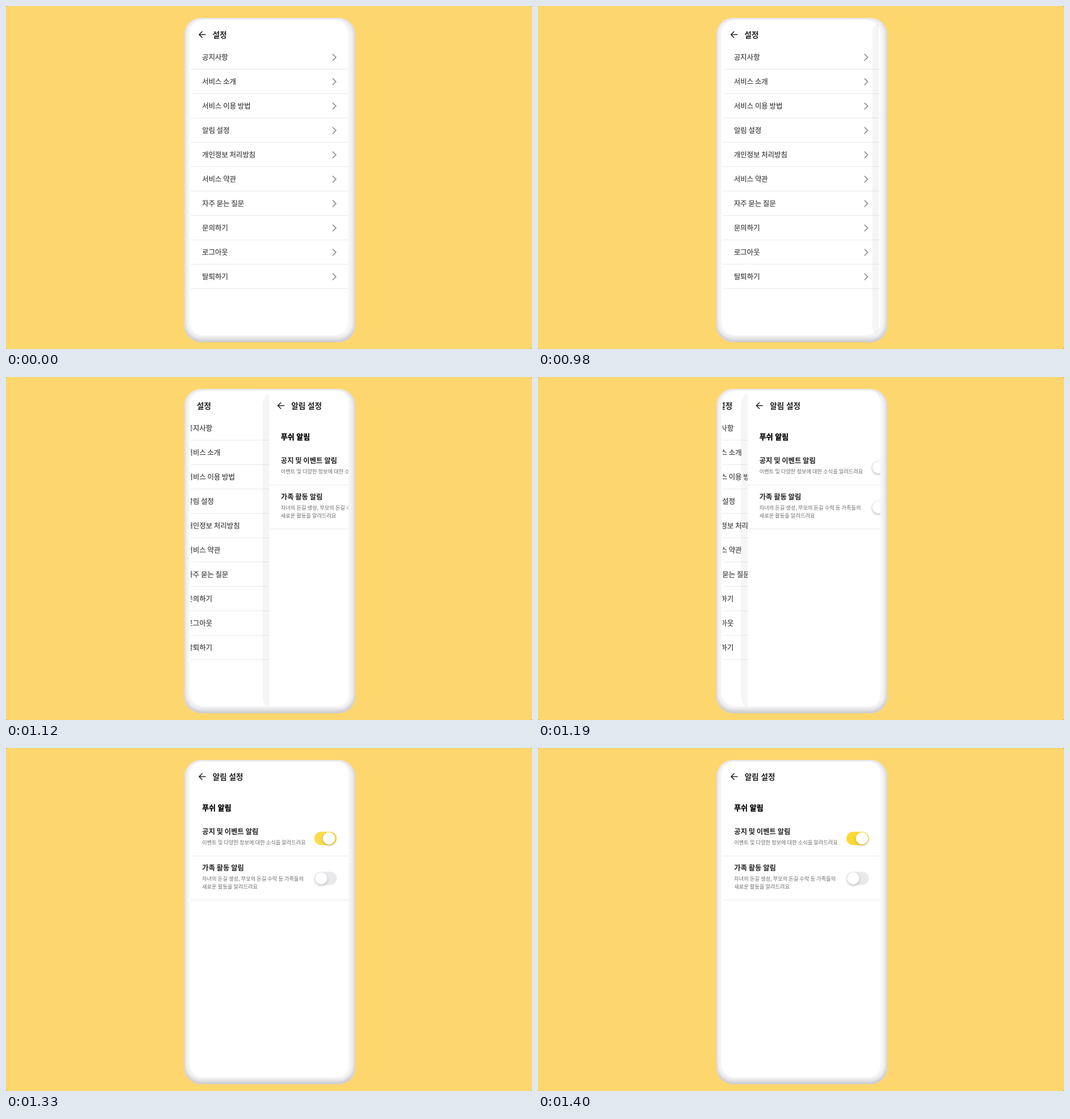
Write an HTML page that moves like this. It is 926 by 605 pixels and loops after 2380 ms.

```html
<!DOCTYPE html>
<html lang="ko">
<head>
<meta charset="utf-8">
<style>
  html, body { margin: 0; width: 100%; height: 100%; overflow: hidden; background: #5e5a50; }
  #stage { position: relative; width: 926px; height: 605px; border-radius: 2px; background: #fed66e; overflow: hidden; }
  #phone {
    position: absolute; left: 314px; top: 21px; width: 301px; height: 572px; border-radius: 30px; background: #f6f6f7;
    box-shadow: inset 0 -6px 8px -1px #c6c5ca, inset -4px 0 7px -1px #dcdbdf, inset 2px 1px 4px #e9e9ec;
  }
  svg { position: absolute; left: 0; top: 0; }
  text { font-family: "Noto Sans CJK KR", "Noto Sans CJK", sans-serif; fill: #222; }
  .row { font-size: 12.4px; fill: #444; stroke: #444; stroke-width: .25px; }
  .title { font-size: 13.6px; font-weight: 700; }
  .head { font-size: 13px; font-weight: 900; fill: #000; stroke: #000; stroke-width: .3px; }
  .item { font-size: 12.35px; font-weight: 700; }
  .note { font-size: 9.25px; fill: #6c6c6c; }
  .row, .item, .note { word-spacing: -.057em; }
  .line { fill: #e9e9eb; }
  .icon { fill: none; stroke: #222; stroke-width: 1.6; stroke-linecap: round; stroke-linejoin: round; }
  .more { stroke: #999; stroke-width: 1.8; }
  .knob { fill: #fff; filter: drop-shadow(0 2px 2px rgba(0, 0, 0, .22)); }
</style>
</head>
<body>
<div id="stage">
  <div id="phone"></div>
  <svg width="926" height="605">
    <clipPath id="view"><rect x="325" y="24" width="277.5" height="557" rx="20"/></clipPath>
    <rect x="323" y="24.5" width="279.5" height="556.5" rx="25" fill="#fff"/>
    <g clip-path="url(#view)">
      <g id="menu"></g>
      <g id="alerts"></g>
    </g>
  </svg>
</div>
<script>
const LOOP = 2380, STEP = 70, WIDTH = 277;
const $ = id => document.getElementById(id);
const text = (cls, y, str, x = 345.3) => `<text class="${cls}" x="${x}" y="${y}">${str}</text>`;
const line = y => `<rect class="line" x="325" y="${y}" width="278" height="1"/>`;
const header = str =>
  `<path class="icon" d="M351 50.5H340M345.3 45.2L340 50.5L345.3 55.8"/>` + text("title", 56.1, str, 363.8);
const toggle = (id, y) =>
  `<rect id="${id}Track" x="543" y="${y - 11.8}" width="39.3" height="23.6" rx="11.8" fill="#e9e9eb"/>
   <circle id="${id}Knob" class="knob" cx="554.8" cy="${y}" r="10.7"/>`;

const items = ["공지사항", "서비스 소개", "서비스 이용 방법", "알림 설정", "개인정보 처리방침",
  "서비스 약관", "자주 묻는 질문", "문의하기", "로그아웃", "탈퇴하기"];

$("menu").innerHTML = header("설정") + items.map((str, i) => {
  const y = 90.5 + 43 * i;
  return text("row", y + 4.7, str) + line(y + 20.5) +
    `<path class="icon more" d="M575.4 ${y - 5.3}l5.4 5.3l-5.4 5.3"/>`;
}).join("");

$("alerts").innerHTML =
  `<path d="M325 31h-4q-8 4 -8 24V557q0 20 8 24h4z" fill="#50505f" opacity=".06"/>
   <rect x="325" y="24" width="280" height="557" fill="#fff"/>` +
  header("알림 설정") +
  text("head", 110.4, "푸쉬 알림") +
  text("item", 151.8, "공지 및 이벤트 알림") +
  text("note", 170.4, "이벤트 및 다양한 정보에 대한 소식을 알려드려요") +
  line(190) +
  text("item", 215.8, "가족 활동 알림") +
  text("note", 234, "자녀의 돈길 생성, 부모의 돈길 수락 등 가족들의") +
  text("note", 248, "새로운 활동을 알려드려요") +
  line(267.5) + toggle("news", 159.5) + toggle("family", 230);

// cubic-bezier(.42, 0, .58, 1)
function ease(x) {
  if (x <= 0) return 0;
  if (x >= 1) return 1;
  let lo = 0, hi = 1, s;
  for (let i = 0; i < 24; i++) {
    s = (lo + hi) / 2;
    if (1.26 * s * (1 - s) ** 2 + 1.74 * s * s * (1 - s) + s ** 3 < x) lo = s; else hi = s;
  }
  return s * s * (3 - 2 * s);
}

const mix = (a, b, p) => a + (b - a) * p;
const off = [233, 233, 235], on = [253, 216, 53];

function draw() {
  const t = Math.floor(performance.now() % LOOP / STEP) * STEP;
  const slide = t < 980 ? 0 : ease((t - 962.5) / 315);
  const flip = ease((t - 1190) / 185);
  $("menu").setAttribute("transform", `translate(${-0.2 * WIDTH * slide})`);
  $("alerts").setAttribute("transform", `translate(${WIDTH * (1 - slide)})`);
  $("alerts").style.display = slide ? "" : "none";
  $("newsKnob").setAttribute("cx", mix(554.8, 570.4, flip));
  $("newsTrack").setAttribute("fill", `rgb(${off.map((c, i) => Math.round(mix(c, on[i], flip)))})`);
  requestAnimationFrame(draw);
}
draw();
</script>
</body>
</html>
```
